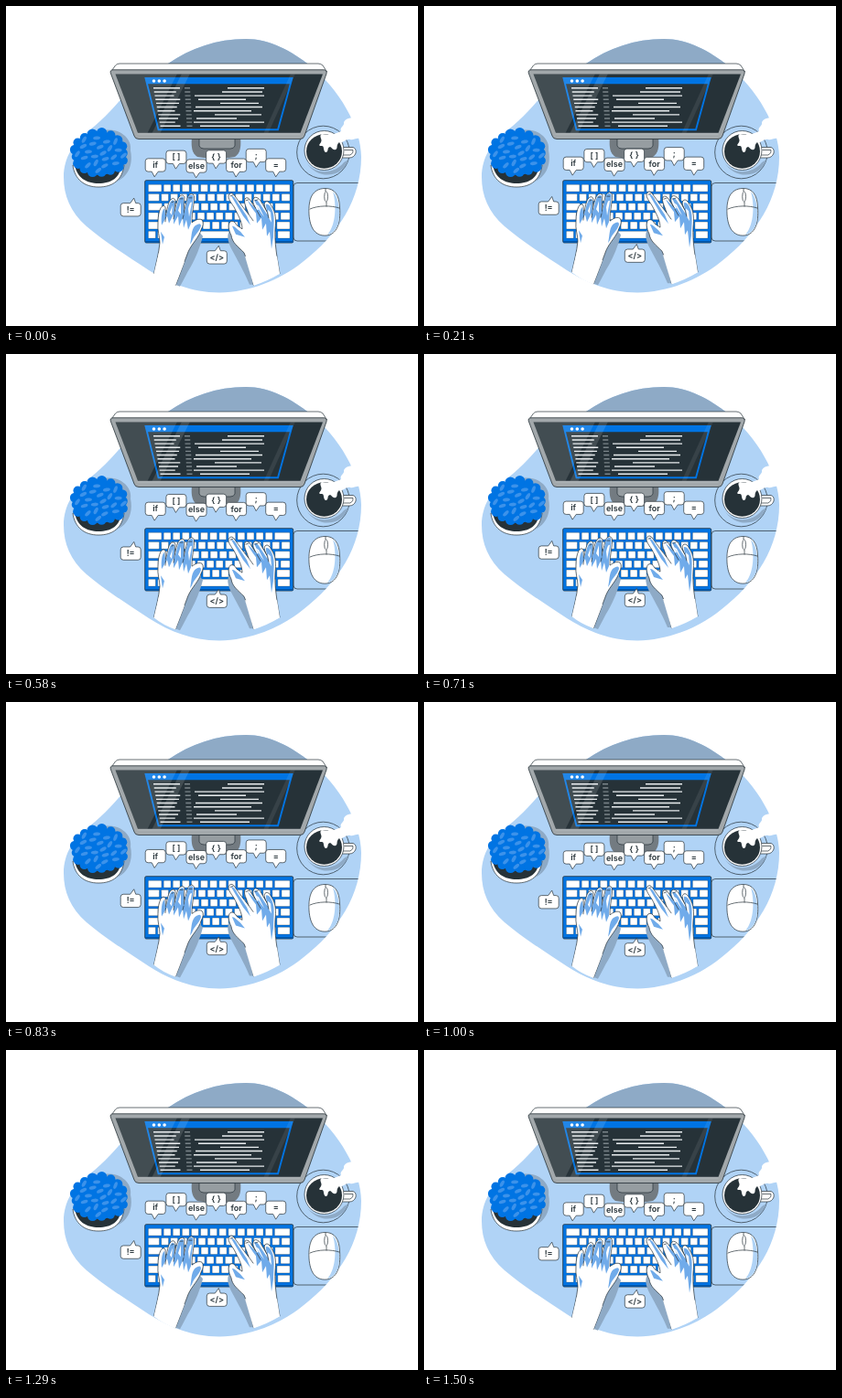
An HTML page that plays this animation: 450 by 350 pixels, repeating every 1540 ms.

```html
<!DOCTYPE html>
<html lang="en">
<head>
<meta charset="utf-8">
<title>Coding desk</title>
<style>
html, body { margin: 0; width: 100%; height: 100%; overflow: hidden; background: #fff; }
svg { display: block; width: 100vw; height: 100vh; }
text { font: 600 9px Inter, "Open Sans", sans-serif; text-anchor: middle; fill: #263238; }
.line { fill: none; stroke: #263238; stroke-width: .7; stroke-linecap: round; stroke-linejoin: round; }
.white { fill: #fff; stroke: #263238; stroke-width: .7; stroke-linejoin: round; }
.shade { fill: #8eaac6; }
.mid { fill: #70abea; }
</style>
</head>
<body>
<svg id="stage" viewBox="0 0 450 350">
  <defs>
    <path id="blob" d="M177 63C202 46 230 36 262 36C288 36 312 49 333 66C363 90 388 132 388 165C388 211 363 250 324 280C299 300 266 313 233 313.500C202 313 178 303 156 289C132 273 108 258 88 241C70 225 63 207 63 187C63 165 75 148 91 136C109 122 120 108 129 98C143 83 158 73 177 63Z"/>
    <clipPath id="inBlob"><use href="#blob"/></clipPath>
    <clipPath id="inScreen"><path d="M119.500 74.500H346L321.500 138.800H144Z"/></clipPath>
  </defs>

  <use href="#blob" fill="#b0d3f6"/>
  <path class="shade" clip-path="url(#inBlob)" d="M140 30H350V71H140Z"/>

  <!-- mouse pad and mouse -->
  <g clip-path="url(#inBlob)">
    <path class="line" d="M392 193.500H318Q314 193.500 314 197.500V253Q314 257 318 257H360"/>
  </g>
  <path class="white" d="M348 199.500C359 199 364 207 364.500 220C366 238 361 250 350 251C338 252 332 243 331 228C330 210 335 200 348 199.500Z"/>
  <path fill="#b0d3f6" d="M357 203C364 209 365 226 363.500 235C362 244 357 249 351 250C359 242 362 221 357 203Z"/>
  <path class="line" d="M332 222C341 218 355 218 364 221M349 200V203M350 214V219"/>
  <ellipse class="white" cx="349.600" cy="208.500" rx="1.900" ry="5.500"/>

  <!-- coffee -->
  <g clip-path="url(#inBlob)">
    <circle class="line" cx="346.500" cy="160" r="28.800"/>
    <path class="shade" d="M328 171C336 184 358 185 369 171L374 168C368 188 340 191 328 171Z"/>
  </g>
  <path class="white" d="M366 154.500L379 154.500Q383 156 382 161Q380 166 375 166L366 166Z"/>
  <path class="line" d="M368 163H376Q380 161 379 157.500H370"/>
  <circle class="white" cx="347.500" cy="158" r="21.500"/>
  <ellipse cx="347.500" cy="159" rx="19.500" ry="18.700" fill="#263238"/>
  <path fill="#fff" d="M384 122C377 122 372 122 369 127C370 132 364 132 366 137C359 140 353 142 345 140C341 142 346 146 344 149C343 151 340 153 345 153C348 153 346 158 349 160C353 160 350 155 354 154C356 155 357 158 360 157C363 156 360 152 364 149C369 150 371 145 376 146C379 147 382 144 387 145Z"/>

  <!-- plant -->
  <path class="shade" d="M107 136C124 133 138 145 136 158C140 177 130 193 111 194Z"/>
  <path class="white" d="M73 174C75 190 86 198 101 198C117 198 127 190 129 174Z"/>
  <path fill="#263238" d="M75 173C77 188 88 194 101 194C115 194 125 188 126 173Z"/>
  <g id="bush"></g>

  <!-- monitor -->
  <path d="M203 143H256C257 154 256 161 250 165Q230 169 209 165C203 161 202 154 203 143Z" fill="#737b81"/>
  <path d="M211 145H250V153Q249 156 245 156H216Q212 156 211 153Z" fill="#969da1" stroke="#263238" stroke-width=".7"/>
  <path class="white" d="M114.500 72L119.500 65Q121 63 124 63H341Q344 63 346 65L350.500 72Z"/>
  <path d="M117 69.800H347Q351 70 350 74L326 142Q325 145.500 321 145.500H145Q141 145.500 140 142L114.500 74Q113 70 117 69.800Z" fill="#a2a8ab" stroke="#263238" stroke-width=".8"/>
  <path d="M119.500 74.500H346L321.500 138.800H144Z" fill="#263238"/>
  <path d="M143.500 140H321.500" stroke="#b5babd" stroke-width=".8"/>
  <g clip-path="url(#inScreen)">
    <path d="M152.500 79H312.500L297 135.200H166.500Z" fill="#263238" stroke="#0074e3" stroke-width="1.900"/>
    <path d="M152 78.500H313L311.300 85.300H153.800Z" fill="#0074e3"/>
    <g id="code"></g>
    <path d="M119 74H187L154 140H119ZM192 74H201L168 140H159Z" fill="#fff" opacity=".13"/>
    <path d="M311 74H316L286 140H281Z" fill="#fff" opacity=".08"/>
  </g>
  <g fill="#fff"><circle cx="161.500" cy="82" r="1.800"/><circle cx="167.300" cy="82" r="1.800"/><circle cx="173.100" cy="82" r="1.800"/></g>

  <!-- keyboard -->
  <rect x="151.700" y="190.700" width="162" height="68.300" rx="1.500" fill="#0074e3" stroke="#263238" stroke-width=".8"/>
  <path d="M152 257.800H313.500" stroke="#0056aa" stroke-width="1.500"/>
  <g id="keys"></g>

  <g id="hands">
    <path class="shade" d="M209 245L215 252C212 264 207 276 202 285C197 293 194 300 190 307L182 304ZM245 245C239 252 244 262 249 271C256 284 262 295 266 305L272 305L264 270Z"/>
    <path class="white" d="M161.500 293C164 281 167 270 168 259C168 252 165 246 166 237C166 230 167 225 169 221Q172 217 174 220L174.500 231C176 222 177 216 179 213Q183 208 185 213L183.500 229C185 219 187 212 189 209Q193 205 195 209L194 229C196 217 198 211 199 208Q203 203 205.500 208C206 216 203 225 203 237C206 235 210 232 214 234Q217 238 213 245C211 253 203 260 199 269C194 282 190 294 185 306"/>
    <path fill="#fff" d="M161.500 293Q171 301 185 306L195 280L167 270Z"/>
    <path class="mid" d="M199 209Q202 205 204.500 208C205 216 202 226 202 238L199 245L197 234L194 243L193 232L189 241L188 230L183 239V228L178 238L176 230L170 240C169 230 171 222 173 222L174.500 231C177 222 178 217 180 214Q182 211 184 214L183.500 229C187 219 187 213 190 210Q193 207 194 210L194 229Z"/>
    <path fill="#fff" d="M199 222Q201 213 203 215L200 231ZM188 224L191 215L191 228ZM179 226L182 218L181 229Z"/>
    <path class="mid" d="M206 241C210 238 213 237 213 241C210 249 206 250 203 258L201 261C203 252 202 246 206 241ZM169 247L173 253L171 261Z"/>
    <path class="line" d="M174.500 231L174 236M183.500 229L183 233M194 229L193 233M200 210L203 210M190 211L193 211M181 215L183 214"/>

    <path class="white" d="M270.500 306C268 294 265 281 260 270C253 263 247 259 246 251C243 245 242 239 245 236Q249 234 252 240L258 244C258 236 253 228 249 220C245 214 241 209 244 206Q247 203 250 208C255 215 260 222 265 228C263 221 259 215 261 211Q264 208 267 213L274 224C271 218 268 214 271 210Q274 208 278 213L285 225C282 219 281 216 284 214Q287 213 290 219C295 226 295 235 294 244C293 258 296 275 299 293"/>
    <path fill="#fff" d="M270.500 306Q286 301 299 293L296 274L261 274Z"/>
    <path class="mid" d="M271 212Q274 211 277 216L285 228C288 231 283 220 284 217Q288 216 291 224C294 232 292 242 292 253L290 266L288 247L285 252L284 238L280 245L279 232L274 238L273 227Q266 218 264 213L270 219Q274 224 276 223Z"/>
    <path fill="#fff" d="M273 217L276 219L282 231L279 227ZM286 223L289 226L290 237L287 232Z"/>
    <path class="mid" d="M246 208Q249 207 253 215L263 230L267 240L259 230ZM247 241C249 240 252 244 256 247L261 253L251 250Z"/>
    <path class="line" d="M265 228L270 235M274 224L278 231M285 225L287 232M245 208L248 207M262 213L265 212M272 213L275 212"/>
  </g>
  <g id="tags"></g>
</svg>
<script>
const NS = "http://www.w3.org/2000/svg";
const $ = id => document.getElementById(id);
function add(parent, tag, attrs, text) {
  const el = document.createElementNS(NS, tag);
  for (const k in attrs) el.setAttribute(k, attrs[k]);
  if (text) el.textContent = text;
  parent.append(el);
  return el;
}
let seed = 9;
const rnd = () => (seed = (seed * 16807) % 2147483647) / 2147483647;

// Plant: ragged crown with lighter leaves
const bush = $("bush");
add(bush, "ellipse", { cx: 102, cy: 162, rx: 28, ry: 23, fill: "#0074e3" });
for (let i = 0; i < 17; i++) {
  const a = i * Math.PI * 2 / 17, out = 1 + rnd() * .1;
  add(bush, "circle", {
    cx: 102 + 26 * out * Math.cos(a), cy: 161 + 20.5 * out * Math.sin(a),
    r: 4.5 + rnd() * 1.5, fill: "#0074e3"
  });
}
for (let i = 0; i < 22; i++) {
  const a = i * 2.4, r = Math.sqrt((i + .5) / 22);
  const x = 102 + 27 * r * Math.cos(a), y = 161 + 20 * r * Math.sin(a);
  add(bush, "ellipse", {
    cx: x, cy: y, rx: 1.9, ry: 4, fill: "#3c92ea",
    transform: `rotate(${10 + rnd() * 80} ${x} ${y})`
  });
}

// Code rows: left width, right start, right end
const rows = [
  [29, 242, 282], [24, 236, 280], [21, 206, 282], [27, 210, 262], [25, 234, 276], [22, 207, 280],
  [19, 205, 268], [24, 228, 279], [21, 208, 252], [17, 205, 282], [22, 212, 266]
];
rows.forEach(([w, a, b], i) => {
  const y = 89.8 + i * 4.15, x = 161 + i * .75;
  const dash = (x1, x2, color) =>
    add($("code"), "path", { d: `M${x1} ${y}H${x2}`, stroke: color, "stroke-width": 1.4 });
  dash(x, x + w, "#e9edef");
  dash(195 + i * .25, 201 + i * .25, "#7b858a");
  dash(a, b, "#e9edef");
});

// Keyboard: width of the first key in each row
[14.5, 12, 15, 11, 17, 8].forEach((first, r) => {
  const y = 195.3 + r * 10.2;
  let x = 155.4, w = first, n = 0;
  while (x < 307) {
    if (r === 5 && n === 4) w = 48;
    if (x + w > 301) w = 310 - x;
    add($("keys"), "rect", { x, y, width: w, height: 7.8, rx: .7, fill: "#fff", stroke: "#263238", "stroke-width": .3 });
    x += w + 2.3;
    w = 7.8;
    n++;
  }
});

// Speech tags: label, left, top, tail offset, tail up
const tags = [
  ["if", 152.2, 167, 10], ["[ ]", 174.9, 158.3, 10.5], ["else", 197, 168, 10.5],
  ["{ }", 218.6, 158, 10.5], ["for", 240.6, 167.2, 10.5], [";", 262.2, 156.5, 11],
  ["=", 283.7, 167, 11], ["!=", 125.2, 215.8, 14.5, true], ["</>", 219.3, 267.9, 13, true]
];
for (const [label, x, y, t, up] of tags) {
  const g = add($("tags"), "g", { transform: `translate(${x} ${y})` });
  const top = up ? `H${t - 4}L${t} -5.5L${t + 2} 0H19` : "H19";
  const bottom = up ? "H3" : `H${t + 4}L${t} 20L${t - 3} 14.300H3`;
  add(g, "path", { class: "white", d: `M3 0${top}Q22 0 22 3V11.300Q22 14.300 19 14.300${bottom}Q0 14.300 0 11.300V3Q0 0 3 0Z` });
  add(g, "text", { x: 11, y: 10.2 }, label);
}

const LOOP = 1540, RISE = 6.2;
function draw(now) {
  const u = ((now + 20) % LOOP) / LOOP;
  const dy = -RISE * (1 - Math.abs(2 * u - 1));
  for (const id of ["hands", "tags"]) $(id).setAttribute("transform", `translate(0 ${dy.toFixed(3)})`);
}
const start = performance.now();
function tick() {
  draw(performance.now() - start);
  requestAnimationFrame(tick);
}
tick();
</script>
</body>
</html>
```
